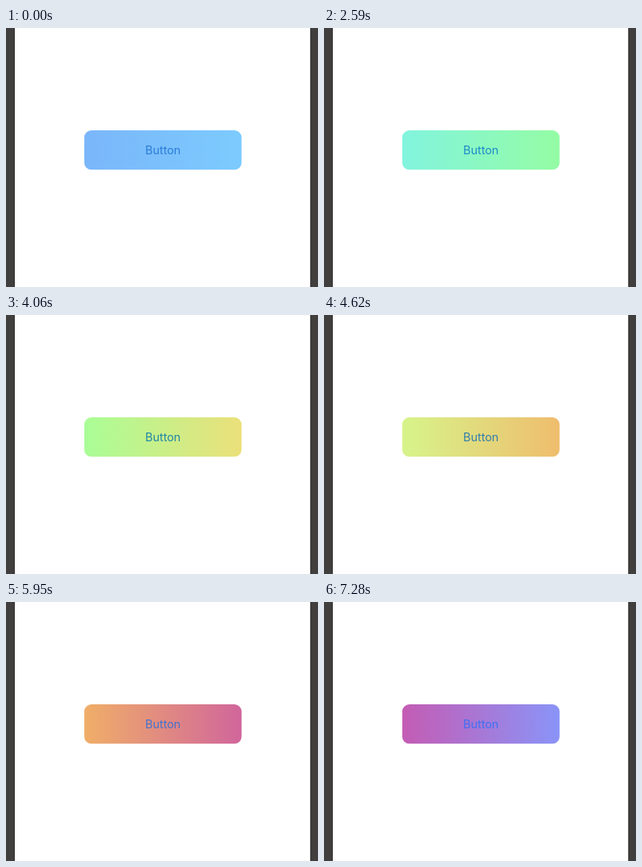
Write an HTML page that moves like this. It is 390 by 324 pixels and loops after 7350 ms.

```html
<!DOCTYPE html>
<html lang="en">
<head>
<meta charset="utf-8">
<style>
  html, body { margin: 0; width: 100%; height: 100%; overflow: hidden; background: #fff; }
  svg { display: block; }
  text { font: 14.4px Inter, Roboto, sans-serif; text-anchor: middle; }
</style>
</head>
<body>
<svg width="390" height="324" viewBox="0 0 390 324">
  <defs>
    <linearGradient id="fill">
      <stop id="left" offset="0"/>
      <stop id="right" offset="1"/>
    </linearGradient>
  </defs>
  <rect width="390" height="324" fill="#fff"/>
  <path d="M0 0H11V324H0ZM380.5 0H390V324H380.5Z" fill="#413f3d"/>
  <path d="M10.5 0V324M381 0V324" stroke="#2f2d2c"/>
  <rect x="97.8" y="128" width="196.7" height="49.3" rx="9" fill="url(#fill)"/>
  <text id="label" x="196.2" y="158">Button</text>
</svg>
<script>
const LOOP = 7350;
const LAG = 1100; // the left edge repeats the right edge's colours this much later

// [time in ms, colour]
const sweep = [
  [-1100, 0x7ab6fa], [0, 0x7ccbfe], [370, 0x7ccdfe], [1470, 0x82f6dc],
  [2190, 0x84fcae], [2960, 0xa9fd96], [3290, 0xcefd92], [4060, 0xebe07a],
  [5110, 0xf29e62], [5480, 0xec7a68], [6180, 0xc45cb4], [6580, 0xa455e2],
  [7280, 0x8a94f8]
];
const ink = [
  [0, 0x2b7cd6], [1470, 0x1f7fe0], [3290, 0x1c90b8], [4060, 0x2087a8],
  [5110, 0x4078b0], [6580, 0x4470e8], [7280, 0x3c70f2]
];

const channels = c => [c >> 16, c >> 8 & 255, c & 255];

function colorAt(keys, t) {
  const next = keys.findIndex(k => k[0] > t);
  const i = next < 0 ? keys.length - 1 : next;
  const [t0, c0] = keys[i - 1], [t1, c1] = keys[i];
  const p = Math.min(1, (t - t0) / (t1 - t0));
  const end = channels(c1);
  return `rgb(${channels(c0).map((v, n) => Math.round(v + (end[n] - v) * p))})`;
}

const [left, right, label] = ['left', 'right', 'label'].map(id => document.getElementById(id));
const start = performance.now();

function draw() {
  const now = (performance.now() - start) % LOOP;
  const step = now < 5040 ? 140 : 70;
  const t = Math.floor(now / step) * step;
  left.setAttribute('stop-color', colorAt(sweep, t - LAG));
  right.setAttribute('stop-color', colorAt(sweep, t));
  label.setAttribute('fill', colorAt(ink, t));
  requestAnimationFrame(draw);
}
draw();
</script>
</body>
</html>
```
